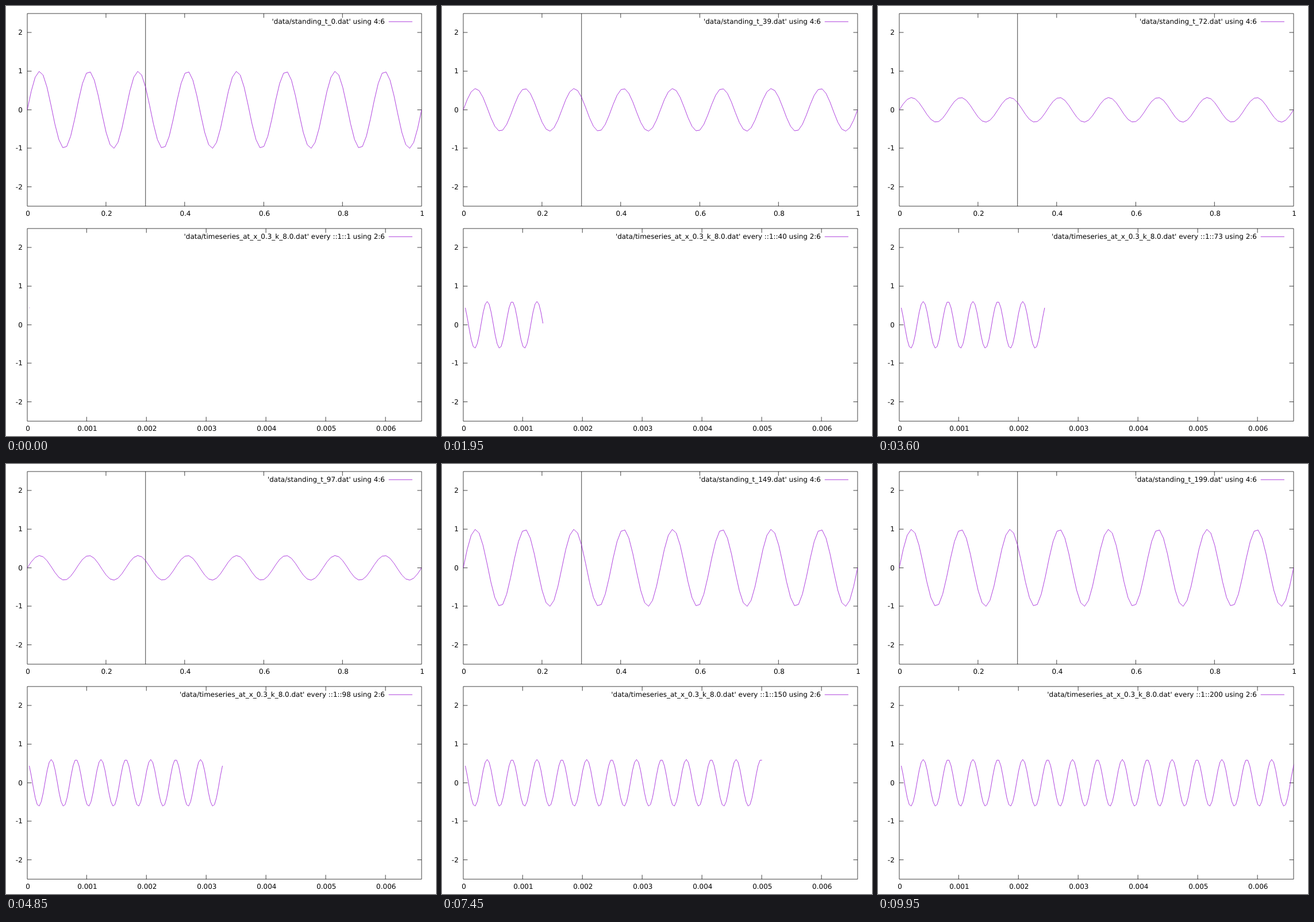
Write an HTML page that moves like this. It is 748x748 px and loops after 10000 ms.

```html
<!DOCTYPE html>
<html lang="en">
<head>
<meta charset="utf-8">
<title>Standing wave</title>
<style>
  html, body { margin: 0; width: 100%; height: 100%; overflow: hidden; background: #fff; }
  svg { display: block; width: 748px; height: 748px; }
  text { font: 16px "DejaVu Sans", sans-serif; fill: #000; white-space: pre; text-rendering: geometricPrecision; }
  path { fill: none; stroke: #000; stroke-width: 1; }
  .wave { stroke: #9400d3; stroke-linejoin: round; }
</style>
</head>
<body>
<svg id="stage" viewBox="0 0 1000 1000">
  <defs><clipPath id="clip"><rect x="49" y="0" width="918" height="1000"/></clipPath></defs>
</svg>
<script>
const STEP = 50, STEPS = 200;
const LEFT = 49.5, RIGHT = 966.5, WIDTH = RIGHT - LEFT;
const HEIGHT = 448, UNIT = HEIGHT / 5, TICK = 10;
const WAVES = 8, PERIOD = 12.5, PROBE = 0.3;
const TAU = 2 * Math.PI;
const stage = document.getElementById('stage');

function add(tag, attrs, content = '') {
  const el = document.createElementNS('http://www.w3.org/2000/svg', tag);
  for (const key in attrs) el.setAttribute(key, attrs[key]);
  el.textContent = content;
  return stage.appendChild(el);
}

const snap = v => Math.floor(v + 1e-6) + 0.5;
const label = (x, y, anchor, s) => add('text', { x, y, 'text-anchor': anchor }, s);

function makePlot(top, xMax, xStep, marker) {
  const bottom = top + HEIGHT, zero = top + HEIGHT / 2;
  let d = `M${LEFT} ${top}H${RIGHT}V${bottom}H${LEFT}Z`;
  for (let v = -2; v <= 2; v++) {
    const y = snap(zero - 0.5 - v * UNIT);
    d += `M${LEFT} ${y}h${TICK}M${RIGHT} ${y}h${-TICK}`;
    label(38.5, y + 5.5, 'end', String(v));
  }
  for (let i = 0; i * xStep <= xMax + 1e-9; i++) {
    const x = snap(LEFT - 0.5 + WIDTH * i * xStep / xMax);
    if (x > LEFT && x < RIGHT) d += `M${x} ${top}v${TICK}M${x} ${bottom}v${-TICK}`;
    label(x + 1.5, bottom + 22, 'middle', String(+(i * xStep).toFixed(3)));
  }
  if (marker) d += `M${snap(LEFT - 0.5 + WIDTH * marker)} ${top}V${bottom}`;
  add('path', { d });
  add('path', { d: `M890 ${top + 19}H945`, class: 'wave' });
  return {
    zero,
    title: label(881, top + 23.5, 'end', ''),
    curve: add('path', { class: 'wave', 'clip-path': 'url(#clip)' })
  };
}

const space = makePlot(17.5, 1, 0.2, PROBE);
const series = makePlot(517.5, 0.0066, 0.001);

const shape = x => Math.sin(TAU * WAVES * x);
// Leapfrog solution that starts at rest with unit amplitude
const swing = n => Math.cos(TAU * (n + 0.5) / PERIOD) / Math.cos(Math.PI / PERIOD);

function trace(plot, from, to, xAt, yAt) {
  const pts = [];
  for (let i = from; i <= to; i++) {
    pts.push((LEFT + WIDTH * xAt(i)).toFixed(2) + ' ' + (plot.zero - UNIT * yAt(i)).toFixed(2));
  }
  plot.curve.setAttribute('d', 'M' + pts.join('L') + (pts.length === 1 ? 'h1' : ''));
}

let shown = -1;
function draw(ms) {
  const n = Math.floor(ms / STEP) % STEPS;
  if (n === shown) return;
  shown = n;
  const amp = swing(n);
  space.title.textContent = `'data/standing_t_${n}.dat' using 4:6`;
  series.title.textContent = `'data/timeseries_at_x_0.3_k_8.0.dat' every ::1::${n + 1} using 2:6`;
  trace(space, 0, 100, i => i / 100, i => amp * shape(i / 100));
  trace(series, 1, n + 1, i => i / 198, i => swing(i) * shape(PROBE));
}

function loop() {
  draw(performance.now());
  requestAnimationFrame(loop);
}
draw(0);
requestAnimationFrame(loop);
</script>
</body>
</html>
```
